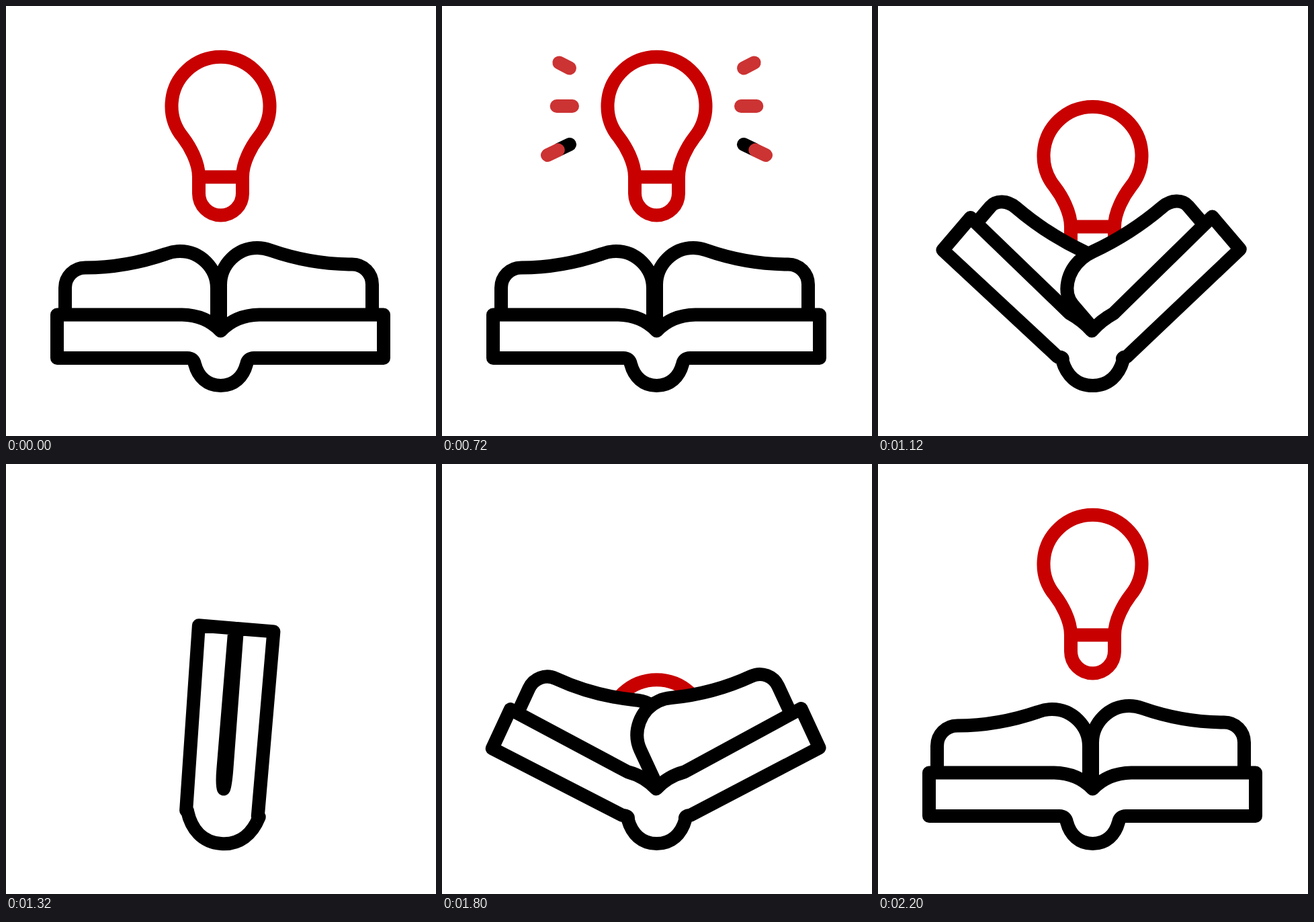
An HTML page for the animation above (2400 ms loop, 640 by 640 pixels).

```html
<!DOCTYPE html>
<html>
<head>
<meta charset="utf-8">
<style>
html, body { margin: 0; width: 100%; height: 100%; overflow: hidden; background: #fff; }
svg { display: block; width: 100%; height: 100%; }
path { stroke-width: 20; stroke-linejoin: round; }
.book { fill: #fff; stroke: #000; }
.ray { fill: none; stroke-linecap: round; }
</style>
</head>
<body>
<svg viewBox="0 0 640 640">
  <clipPath id="clip"><path id="gap"/></clipPath>
  <g id="rays"></g>
  <g id="all">
    <g clip-path="url(#clip)">
      <path id="bulb" fill="none" stroke="#c80000" d="M287 254.5V279A32.5 32.5 0 0 0 352 279V254.5C352 232 366 208 376 195A73 73 0 1 0 263 195C273 208 287 232 287 254.5H352"/>
    </g>
    <path id="leftPage" class="book"/>
    <path id="rightPage" class="book"/>
    <path id="cover" class="book"/>
  </g>
</svg>
<script>
const $ = id => document.getElementById(id);
const LOOP = 2400, RAD = Math.PI / 180;
const mix = (a, b, k) => a + (b - a) * k;
const ramp = (t, a, b) => Math.min(1, Math.max(0, (t - a) / (b - a)));
const smooth = (t, a, b) => { const x = ramp(t, a, b); return x * x * (3 - 2 * x); };

// Each side turns about its own pivot; dir is the sign of the rotation.
const LEFT = { x: 302.75, y: 470.75, dir: 1 };
const RIGHT = { x: 332, y: 474, dir: -1 };

function turn(side, angle, x, y) {
  const a = side.dir * angle * RAD, dx = x - side.x, dy = y - side.y;
  return [side.x + dx * Math.cos(a) - dy * Math.sin(a), side.y + dx * Math.sin(a) + dy * Math.cos(a)];
}

// Page depth flattens onto the cover as the book shuts.
function page(side, angle, points) {
  const depth = 1 - smooth(angle, 24, 80);
  const p = points.map(([x, y]) => turn(side, angle, x, 460 + (y - 460) * depth));
  return `M${p[0]}L${p[1]}C${p[2]} ${p[3]} ${p[4]}C${p[5]} ${p[6]} ${p[7]}` +
    `C${p[8]} ${p[9]} ${p[10]}C${p[11]} ${p[12]} ${p[13]}L${p[14]}`;
}
const leftPoints = [[88, 460], [88, 419.5], [88, 403], [101, 389.5], [118, 389.5],
  [160, 389.5], [200, 382], [238, 369], [245, 366.4], [252, 365], [259, 365],
  [289, 365], [314, 390], [314, 420], [314, 478]];
const rightPoints = [[545, 460], [545, 414.5], [545, 398], [532, 384.5], [515, 384.5],
  [473, 384.5], [432, 377], [393, 363.4], [387, 361.2], [380, 360], [374, 360],
  [344, 360], [319, 385], [319, 415], [319, 478]];

function drawBook(angle) {
  const k = angle / 90, squash = 1 - 0.2 * k ** 3;
  const tips = (side, x) => [turn(side, angle, x, 459.5),
    turn(side, angle, x, side.y + (524 - side.y) * squash)];
  const [li, lo] = tips(LEFT, 76), [ri, ro] = tips(RIGHT, 562);
  const mid = mix(319.5, 317, k);
  const bendY = mix(459.5, 455, k), curveY = mix(460, 478, k);
  const w = 38.5 + 15 * k, top = 533 - 12 * k;
  const lx = 319.5 - w, rx = 319.5 + w;
  const hingeY = mix(524, 520, k), lh = mix(270, 264, k), rh = mix(369, 371, k);
  const inX = 5 + 3 * k, inY = top + 19 + 7 * k, flat = w * 0.52;
  $("cover").setAttribute("d", `M${li}L${mix(262, 314, k)} ${bendY}` +
    `Q${mix(297, 314, k)} ${curveY} ${mid} 483.5` +
    `Q${mix(342, 319, k)} ${curveY} ${mix(377, 319, k)} ${bendY}L${ri}L${ro}L${rh} ${hingeY}` +
    `Q${mix(360, rx, k)} ${hingeY} ${rx} ${top}` +
    `C${rx - inX} ${inY} ${319.5 + flat} 565 319.5 565` +
    `C${319.5 - flat} 565 ${lx + inX} ${inY} ${lx} ${top}` +
    `Q${mix(279, lx, k)} ${hingeY} ${lh} ${hingeY}L${lo}Z`);
  $("leftPage").setAttribute("d", page(LEFT, angle, leftPoints));
  $("rightPage").setAttribute("d", page(RIGHT, angle, rightPoints));

  // The bulb only shows between the two covers.
  const far = (x, tip) => [x + 3 * (tip[0] - x), hingeY + 3 * (tip[1] - hingeY)];
  const lf = far(lh, lo), rf = far(rh, ro);
  $("gap").setAttribute("d", `M${lf}L${lh} ${hingeY}L319.5 565L${rh} ${hingeY}L${rf}V-900H${lf[0]}Z`);
}

// Ray ends run from the bulb outward.
const upper = [190, 92.5, 157, 75.5], middle = [194, 149, 145, 149], lower = [190, 206, 157, 222];
function ray([x1, y1, x2, y2], from, to, color) {
  if (to - from < 0.01) return "";
  const at = k => `${mix(x1, x2, k)} ${mix(y1, y2, k)}`;
  return `<path class="ray" stroke="${color}" d="M${at(from)}L${at(to)}"/>`;
}

function drawRays(t) {
  const from = smooth(t, 880, 1060), to = smooth(t, 570, 880), red = "#cc3333";
  const half = ray(upper, from, to, red) + ray(middle, from, to, red) +
    ray(lower, from, to, "#000") + ray(lower, 1 - to, 1 - from - 0.06 * from, red);
  $("rays").innerHTML = half + `<g transform="matrix(-1 0 0 1 639 0)">${half}</g>`;
}

function swing(t) {
  if (t < 120) return 24 * smooth(t, 0, 120);
  if (t < 280) return 24 - 48 * smooth(t, 120, 280);
  return -24 * (1 - ramp(t, 280, 600)) ** 3;
}

function drop(t) {
  if (t < 856) return 0;
  if (t < 1720) return Math.min(265, 11.5 * ((t - 856) / 104) ** 2);
  return 265 * (1 - smooth(t, 1720, 2200));
}

function draw(t) {
  drawRays(t);
  drawBook(90 * (smooth(t, 980, 1280) - smooth(t, 1630, 1890)));
  $("bulb").setAttribute("transform", `translate(0 ${drop(t)}) rotate(${swing(t)} 319.5 311)`);
  const tilt = 4.75 * Math.sin(2 * Math.PI * ramp(t, 1200, 1640));
  $("all").setAttribute("transform", `rotate(${tilt} 319.5 568)`);
}

const start = performance.now();
function tick() {
  const t = (performance.now() - start) % LOOP;
  draw(Math.floor(t / 40) * 40);
  requestAnimationFrame(tick);
}
tick();
</script>
</body>
</html>
```
